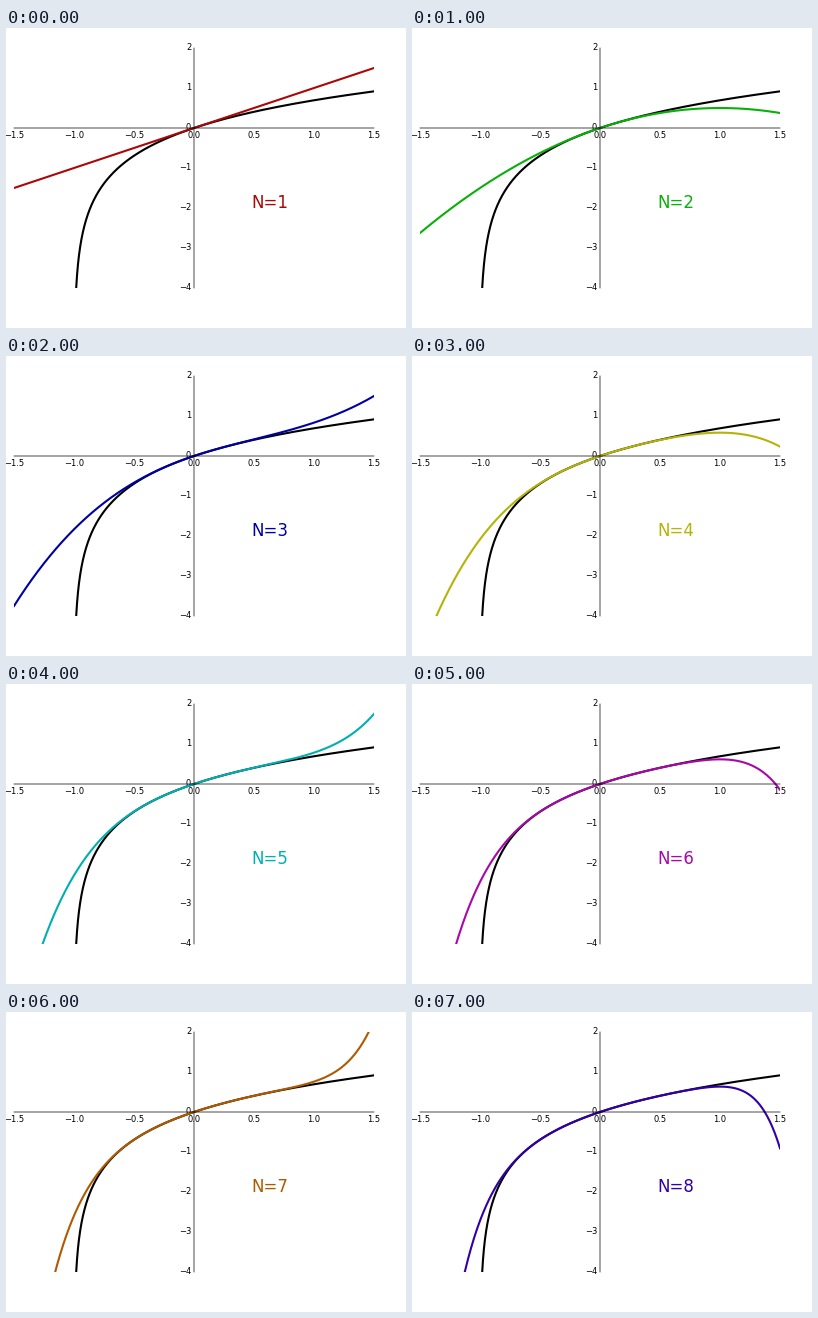
Recreate the animation shown at these times as a matplotlib script. Size 400 px wide and 300 px high, loop 8000 ms.

```python
import matplotlib.pyplot as plt
import numpy as np
from matplotlib.animation import FuncAnimation

plt.rcParams["font.family"] = "DejaVu Sans"

COLORS = ["#a80808", "#08b008", "#0000a4", "#b4b408",
          "#00b0b0", "#a808a8", "#b05a00", "#3200a8"]

fig = plt.figure(figsize=(8, 6), dpi=50, facecolor="white")
ax = fig.add_axes([8 / 400, 40 / 300, 360 / 400, 240 / 300])
ax.set_xlim(-1.5, 1.5)
ax.set_ylim(-4, 2)

# Axes crossing at the origin
for side in ("top", "right"):
    ax.spines[side].set_visible(False)
for side in ("left", "bottom"):
    ax.spines[side].set_position("zero")
    ax.spines[side].set_linewidth(1)
    ax.spines[side].set_snap(False)
ax.set_xticks(np.arange(-1.5, 1.6, 0.5))
ax.set_yticks(range(-4, 3))
ax.tick_params(length=0, pad=4, labelsize=12)
for tick_label in ax.get_yticklabels():
    tick_label.set_va("center")

x = np.linspace(-1.5, 1.5, 601)
x_log = np.linspace(-0.995, 1.5, 1500)
ax.plot(x_log, np.log1p(x_log), color="black", lw=3)
curve, = ax.plot([], [], lw=3)
label = ax.text(0.48, -2, "", fontsize=24)


def taylor(n):
    """Partial sum of the series of log(1 + x)."""
    return sum((-1) ** (k + 1) * x ** k / k for k in range(1, n + 1))


def update(i):
    n = i + 1
    curve.set_data(x, taylor(n))
    curve.set_color(COLORS[i])
    label.set_text(f"N={n}")
    label.set_color(COLORS[i])
    return curve, label


anim = FuncAnimation(fig, update, frames=len(COLORS), interval=1000,
                     repeat=True, repeat_delay=0, blit=False)
plt.show()
```
